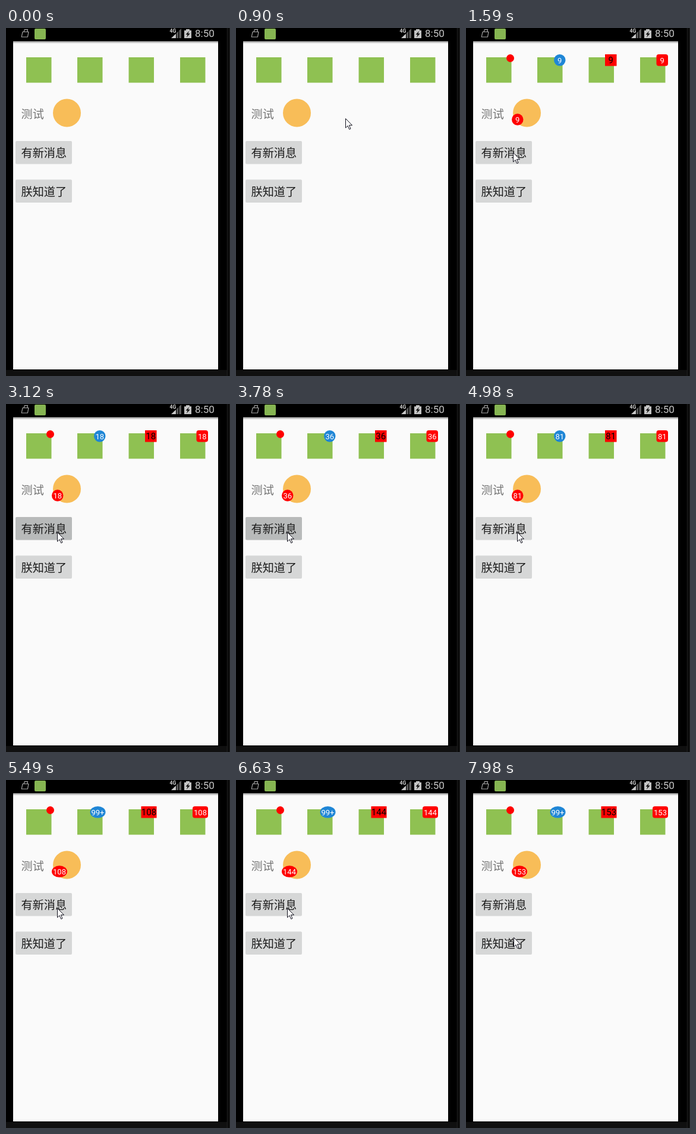
An HTML page for the animation above (8000 ms loop, 377x582 px).

```html
<!DOCTYPE html>
<html lang="zh-CN">
<head>
<meta charset="utf-8">
<title>Badge demo</title>
<style>
  html, body { margin: 0; width: 100%; height: 100%; overflow: hidden; background: #000; }
  svg { display: block; width: 377px; height: 582px; }
  text { font-family: Roboto, "Noto Sans CJK SC", "Noto Sans CJK", sans-serif; }
  .label { font-family: "Noto Sans CJK SC", "Noto Sans CJK", sans-serif; font-size: 19.2px; fill: #1c1c1c; }
  .button { fill: #d6d7d7; }
  .button.down { fill: #b8baba; }
  .count { font-size: 13px; fill: #fff; text-anchor: middle; }
  .square .count { font-size: 15px; fill: #000; }
</style>
</head>
<body>
<svg viewBox="0 0 377 582">
  <defs>
    <linearGradient id="shade" x2="0" y2="1">
      <stop stop-color="#8c8c8c"/>
      <stop offset="1" stop-color="#fafafa"/>
    </linearGradient>
  </defs>

  <!-- device frame -->
  <rect width="377" height="582" fill="#000"/>
  <path d="M0 572H372V582H0Z" fill="#101010"/>
  <path d="M372.5 0V582M375.5 0V582" stroke="#292929"/>
  <rect x="12" y="22" width="345" height="549" fill="#fafafa"/>
  <rect x="12" y="22" width="345" height="4" fill="url(#shade)"/>

  <!-- status bar -->
  <g fill="none" stroke="#a9a9a9" stroke-width="1.2" stroke-linejoin="round">
    <path d="M28 6.5H38L36.4 15H26.2Z"/>
    <path d="M30.2 6L31.2 2.6H36.5L36 6"/>
  </g>
  <rect x="48" y="1" width="19" height="18" rx="2" fill="#86b552"/>
  <text x="275.5" y="8" font-size="8.5" font-weight="700" fill="#d0d0d0">4G</text>
  <path d="M278 17L286 9.5V17Z" fill="#c9c9c9"/>
  <path d="M287 8.5L290 5.5V17H287ZM291.3 4.2L295 1V17H291.3Z" fill="#5b5b5b"/>
  <path d="M300 4H303V2H309V4H312V17H300Z" fill="#c4c4c4"/>
  <path d="M308 5L302.5 11H305.5L304 15.5L309.8 9.3H306.5Z" fill="#111"/>
  <text x="318" y="15" font-size="17" fill="#c8c8c8">8:50</text>

  <!-- icons -->
  <g fill="#8fc152">
    <rect x="34" y="49" width="42.5" height="42.5"/>
    <rect x="120" y="49" width="42.5" height="42.5"/>
    <rect x="206.5" y="49" width="42.5" height="42.5"/>
    <rect x="293" y="49" width="42.5" height="42.5"/>
  </g>
  <circle cx="102.5" cy="142" r="23.5" fill="#f8bd58"/>

  <text class="label" x="25.5" y="150.5" style="fill:#767676">测试</text>
  <rect class="button" id="news" x="16" y="189" width="95" height="38.5" rx="2"/>
  <text class="label" x="25.5" y="215.5">有新消息</text>
  <rect class="button" x="16" y="253.5" width="95" height="38.5" rx="2"/>
  <text class="label" x="25.5" y="280.5">朕知道了</text>

  <g id="badges">
    <circle cx="74.5" cy="50.5" r="6.5" fill="#f00"/>
    <g class="badge" data-right="167.5" data-y="44" data-max="99">
      <rect height="19.5" rx="50%" fill="#1f86d6"/><text class="count"/>
    </g>
    <g class="badge square" data-right="253.5" data-y="44">
      <rect height="19.5" fill="#f00"/><text class="count"/>
    </g>
    <g class="badge" data-right="340" data-y="44">
      <rect height="19.5" rx="4" fill="#f00"/><text class="count"/>
    </g>
    <g class="badge" data-left="77" data-y="143.3">
      <rect height="19.5" rx="50%" fill="#f00"/><text class="count"/>
    </g>
  </g>

  <path id="cursor" d="M.5 .5V16L4 12.6L6.7 18.5L9 17.5L6.4 11.7H11.5Z" fill="#fff" stroke="#10101c"/>
</svg>

<script>
const LOOP = 8000, TICK = 30;
const news = document.getElementById('news');
const cursor = document.getElementById('cursor');
const badgeLayer = document.getElementById('badges');
const badges = [...document.querySelectorAll('.badge')];

const linear = u => u;
const easeOut = u => u * (2 - u);

// start, end, x, y, easing
const moves = [
  [240, 1020, 150, 166, linear],
  [1050, 1380, 79, 208, easeOut],
  [1920, 1980, 79, 211, linear],
  [2460, 2580, 86, 214, linear],
  [7620, 7980, 80, 263, linear]
];

const burst = (start, gap, hold, n) =>
  Array.from({ length: n }, (_, i) => [start + gap * i, hold]);

// press time, hold time
const clicks = [
  [1530, 60], [2310, 90], [3120, 120], [3510, 90], [3780, 90], [4290, 90],
  [4530, 30], ...burst(4690, 160, 80, 4),
  [5400, 90], ...burst(6060, 163, 81, 4), [6780, 90]
];

function cursorAt(t) {
  let x = 380, y = 64;
  for (const [start, end, toX, toY, ease] of moves) {
    if (t < start) break;
    const steps = (end - start) / TICK + 1;
    const u = ease(Math.min(1, (Math.floor((t - start) / TICK) + 1) / steps));
    x += (toX - x) * u;
    y += (toY - y) * u;
  }
  return [Math.round(x), Math.round(y)];
}

function setBadge(g, count) {
  const { left, right, y, max } = g.dataset;
  const [box, text] = g.children;
  const width = count > 99 ? 26 : 19.5;
  const x = left ? +left : right - width;
  box.setAttribute('x', x);
  box.setAttribute('y', y);
  box.setAttribute('width', width);
  text.setAttribute('x', x + width / 2);
  text.setAttribute('y', +y + (g.classList.contains('square') ? 15.3 : 14.7));
  text.textContent = max && count > max ? max + '+' : count;
}

let shown = -1;
function draw(t) {
  const [x, y] = cursorAt(t);
  cursor.setAttribute('transform', `translate(${x} ${y})`);
  cursor.style.display = t < moves[0][0] ? 'none' : '';
  news.classList.toggle('down', clicks.some(([at, hold]) => t >= at && t < at + hold));

  const count = 9 * clicks.filter(([at, hold]) => t >= at + hold).length;
  if (count === shown) return;
  shown = count;
  badgeLayer.style.display = count ? '' : 'none';
  badges.forEach(g => setBadge(g, count));
}

let origin;
function frame(now) {
  origin ??= now;
  draw((now - origin) % LOOP);
  requestAnimationFrame(frame);
}
draw(0);
requestAnimationFrame(frame);
</script>
</body>
</html>
```
